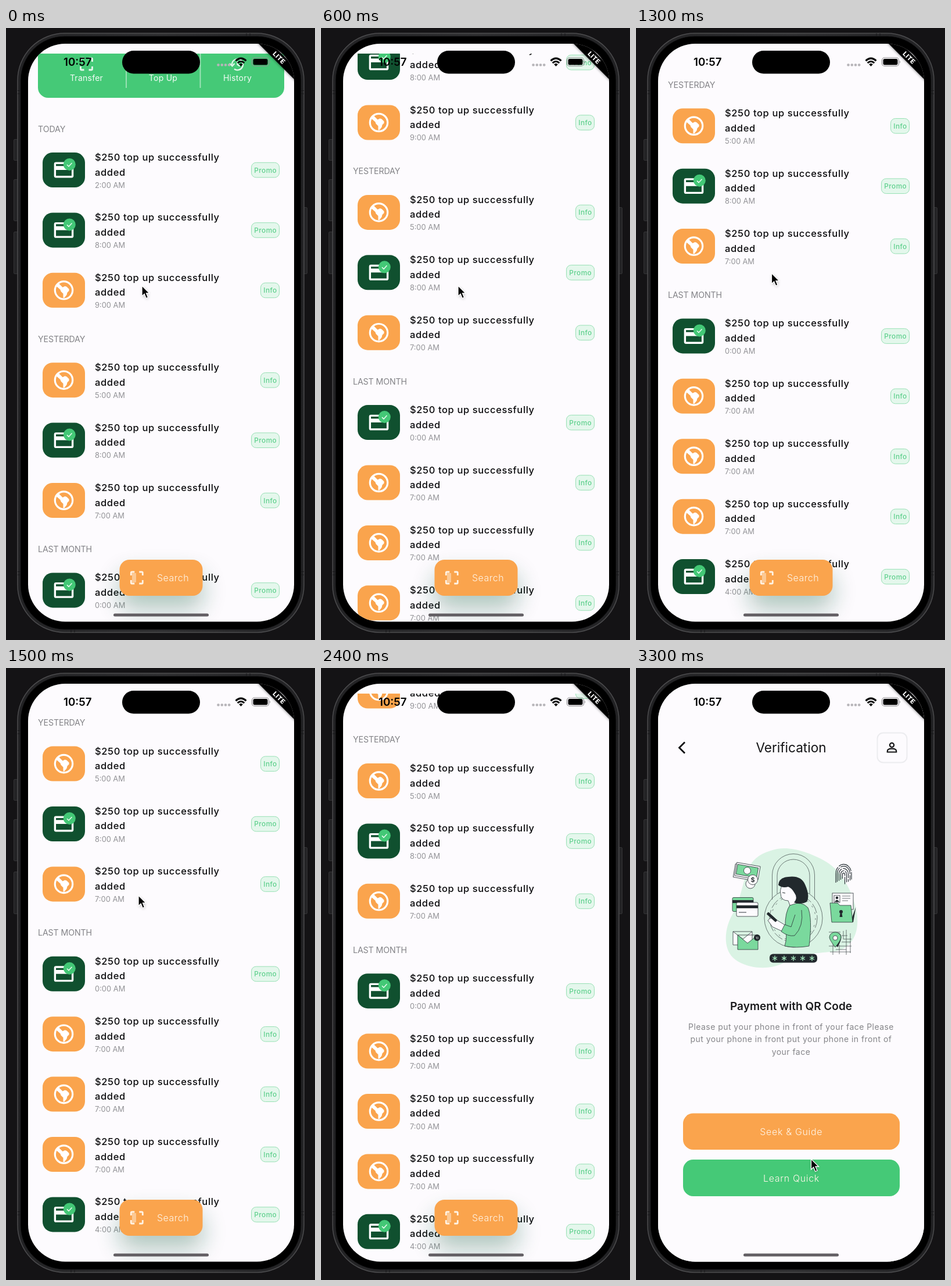
These frames come from a looping animation (532x1052 px, 3400 ms). An HTML page:

```html
<!DOCTYPE html>
<html lang="en">
<head>
<meta charset="utf-8">
<title>Wallet history</title>
<style>
  html, body { margin: 0; width: 100%; height: 100%; overflow: hidden; background: #141315; }
  svg { display: block; width: 532px; height: 1052px; }
  text { font-family: Inter, "Open Sans", sans-serif; }
  .mid { text-anchor: middle; }
  .head { font-size: 14.2px; fill: #838387; letter-spacing: -.1px; }
  .title { font-size: 16.5px; font-weight: 500; letter-spacing: .62px; fill: #0c0c0e; }
  .time { font-size: 12.9px; fill: #929296; }
  .tag { font-size: 11.8px; font-weight: 500; letter-spacing: .45px; fill: #5fd08d; }
  .tab { font-size: 14px; letter-spacing: .25px; fill: #f3fcf6; }
  .btn { font-size: 16px; letter-spacing: .65px; font-weight: 300; fill: #fff6ea; }
  .copy { font-size: 14px; letter-spacing: .45px; fill: #858589; }
  .line { fill: none; stroke: #2b3338; stroke-width: 1; }
  .thin { fill: none; stroke: #4f5a58; stroke-width: .8; }
  .ink { fill: #22292d; }
  .green { fill: #7ad99d; stroke: #2b3338; stroke-width: .8; }
  .paper { fill: #fdfbfe; stroke: #2b3338; stroke-width: .8; }
</style>
</head>
<body>
<svg viewBox="0 0 532 1052">
  <defs>
    <clipPath id="screen"><rect x="38" y="27" width="458" height="993.5" rx="64"/></clipPath>
    <clipPath id="view"><rect x="38" y="44" width="458" height="977"/></clipPath>
    <filter id="soft" x="-50%" y="-120%" width="200%" height="340%"><feGaussianBlur stdDeviation="20"/></filter>
    <filter id="dim" x="-50%" y="-50%" width="200%" height="200%"><feGaussianBlur stdDeviation="2.5"/></filter>
    <linearGradient id="rim" x2="1">
      <stop stop-color="#222224"/><stop offset=".5" stop-color="#303032"/><stop offset="1" stop-color="#222224"/>
    </linearGradient>
    <g id="cardIcon">
      <rect x="-36.5" y="-30" width="73" height="60" rx="17.5" fill="#10502f"/>
      <path transform="scale(1.68) translate(-12 -12)" fill="#fff" fill-rule="evenodd" d="M4 4H20Q22 4 22 6V18Q22 20 20 20H4Q2 20 2 18V6Q2 4 4 4ZM4 6V8H20V6ZM4 12V18H20V12Z"/>
      <circle cx="9.8" cy="-9.5" r="10.5" fill="#43c876"/>
      <path d="M5.5-9l3 3 5.5-6" fill="none" stroke="#e9fbf0" stroke-width="1.5"/>
    </g>
    <g id="globeIcon">
      <rect x="-36.5" y="-30" width="73" height="60" rx="17.5" fill="#faa44d"/>
      <circle r="15.2" fill="none" stroke="#fff" stroke-width="3.2"/>
      <path fill="#fff" d="M-13-7L-9-12-2-5 2-7 5-6 9-2V1L6 4 5 8 1 13H-1V6L-5 2-6-1Z"/>
    </g>
    <g id="scanIcon" fill="none" stroke-width="2.8">
      <path d="M-10-4V-8.500Q-10-10-8.500-10H-4M4-10H8.500Q10-10 10-8.500V-4M10 4V8.500Q10 10 8.500 10H4M-4 10H-8.500Q-10 10-10 8.500V4"/>
    </g>
  </defs>

  <!-- phone body -->
  <g fill="#232325" stroke="#343436">
    <rect x="13.500" y="191.500" width="8" height="36" rx="1.500"/>
    <rect x="13.500" y="260.500" width="8" height="71" rx="1.500"/>
    <rect x="13.500" y="350.500" width="8" height="72" rx="1.500"/>
    <rect x="511" y="308.500" width="7.500" height="114" rx="1.500"/>
  </g>
  <rect x="20" y="9" width="493" height="1030" rx="81" fill="url(#rim)" stroke="#4c4c4e" stroke-width="1.500"/>
  <path d="M20 107.500h5M20 113h5M20 934.500h5M20 940h5M508 107.500h5M508 113h5M508 934.500h5M508 940h5M414 9v5M420 9v5M112 1034v5M118 1034v5" stroke="#171719"/>
  <rect x="25" y="14" width="483" height="1020" rx="76" fill="#000" stroke="#1a1a1c"/>

  <g clip-path="url(#screen)">
    <rect x="38" y="27" width="458" height="994" fill="#fdfbfe"/>

    <g id="home">
      <g clip-path="url(#view)">
        <g id="list">
          <rect x="55" y="-20" width="424" height="140" rx="17.500" fill="#45c977"/>
          <path d="M207 20V103M334.500 20V103" stroke="#a3e4bb" stroke-width="1.800"/>
          <use href="#scanIcon" x="138.500" y="62" stroke="#e6f8ed"/>
          <path d="M389 63a9.500 9.500 0 1 1 4 7.500M385 61l4.500 4.500 4-4.500M398.500 57v6l4 2.500" fill="none" stroke="#e6f8ed" stroke-width="2.200"/>
          <text class="tab mid" x="138.500" y="90.500">Transfer</text>
          <text class="tab mid" x="270.500" y="90.500">Top Up</text>
          <text class="tab mid" x="398.500" y="90.500">History</text>
        </g>
      </g>
      <rect x="195.500" y="937" width="143" height="62" rx="17" fill="#0f5a3a" opacity=".32" filter="url(#soft)"/>
      <rect x="195.500" y="914" width="143" height="62" rx="17" fill="#faa44d"/>
      <rect x="217" y="937" width="7" height="16" fill="#fff" opacity=".4"/>
      <use href="#scanIcon" x="225.300" y="945" stroke="#fff3e4"/>
      <text class="btn" x="260" y="951" style="letter-spacing:.5px">Search</text>
    </g>

    <g id="verify">
      <rect x="38" y="44" width="458" height="977" fill="#fdfbfe"/>
      <path d="M84 127.500L74.500 137 84 146.500" fill="none" stroke="#0c0c0e" stroke-width="2.800"/>
      <text class="mid" x="267" y="144.700" font-size="22.600" fill="#141416">Verification</text>
      <rect x="415.500" y="111.500" width="51" height="51" rx="10" fill="#fdfbfe" stroke="#ececef" stroke-width="2"/>
      <g fill="none" stroke="#161618" stroke-width="2.200">
        <circle cx="440.500" cy="132.500" r="3.600"/>
        <path d="M432.800 144.500V143Q432.800 138.600 440.500 138.600T448.200 143V144.500Z"/>
      </g>

      <path fill="#daf3e4" d="M235 313C262 304 298 317 322 330C350 344 373 380 380 420C386 458 370 486 335 488C298 491 280 494 252 508C222 522 184 514 167 498C149 480 152 446 168 420C180 398 182 374 192 349C200 328 214 319 235 313Z"/>
      <path class="thin" d="M234.500 398V356A36.500 36.500 0 0 1 307.500 356V398M243 388V357A28 28 0 0 1 299 357V388"/>
      <circle class="thin" cx="271" cy="430" r="50"/>
      <circle class="thin" cx="271" cy="430" r="41" stroke-dasharray="17 4"/>
      <circle class="thin" cx="271" cy="430" r="38" stroke-dasharray="3 9"/>

      <!-- figure with phone -->
      <path class="green" d="M266 406Q285 400 296 412Q304 430 298 478Q276 482 256 478Q261 462 257 446Q256 420 266 406Z"/>
      <path class="paper" d="M252 372Q247 383 249 388Q249 400 262 400L265 408 278 404 274 378Z"/>
      <path class="ink" d="M245 373Q246 360 262 359Q284 356 291 372Q300 392 294 402Q283 408 272 403Q279 395 273 387Q268 378 262 376Q252 379 245 373Z"/>
      <path d="M252 386l5 1" class="line"/>
      <path class="paper" d="M227 434Q232 426 242 433L260 444 255 454 235 445Z"/>
      <path class="green" d="M285 416Q289 444 273 460Q262 462 250 453L256 441 267 445 274 424"/>
      <rect class="ink" x="-9" y="-2.200" width="21" height="4.800" rx="1" transform="translate(233 427) rotate(42)"/>

      <g transform="rotate(10 189 351)">
        <rect class="paper" x="169" y="340" width="41" height="23"/>
        <rect class="paper" x="171" y="337" width="41" height="23"/>
        <rect class="green" x="173" y="340" width="36" height="17"/>
        <circle class="paper" cx="191" cy="348" r="6"/>
      </g>
      <circle class="paper" cx="197" cy="371" r="8"/>
      <circle class="paper" cx="201" cy="364" r="8.500"/>
      <text class="mid" x="201" y="368" font-size="11" font-weight="600" fill="#22292d">$</text>

      <rect class="green" x="166" y="394.500" width="36" height="24" rx="2"/>
      <rect class="ink" x="166" y="399" width="36" height="5"/>
      <rect class="paper" x="173" y="403" width="37" height="24" rx="2"/>
      <rect class="ink" x="173" y="408" width="37" height="5"/>
      <path class="line" d="M177 420h13"/>

      <path class="paper" d="M167 453H200V476H167ZM167 453L184 466 200 453"/>
      <path class="green" d="M175 459H210V484H175ZM175 459L192 473 210 459"/>
      <circle class="ink" cx="208.500" cy="463.500" r="5.500"/>
      <text class="mid" x="208.500" y="465.500" font-size="5" fill="#fff">10</text>

      <g id="print" class="line" style="stroke-width:1.200"></g>

      <rect class="paper" x="338" y="387" width="36" height="28"/>
      <rect class="paper" x="341" y="391" width="10" height="12"/>
      <circle class="ink" cx="346" cy="395" r="2.300"/>
      <path class="ink" d="M342 402q4-7 8 0z"/>
      <path class="thin" d="M355 392h14M355 396h14M355 400h10"/>
      <path class="ink" d="M369 437L378.500 411 374 437Z"/>
      <path class="green" d="M334 404H347L351 408H370L373 437H337Z"/>
      <circle class="ink" cx="353" cy="419" r="3"/>
      <path class="ink" d="M352 419h2l1.500 9h-5z"/>

      <path class="thin" d="M332 454H352M357 452V466H371M332 478H371M334 488H370M339 474V493M350 476V492M362 450V493M369 456V490M354 460H364M354 471H370M344 484H362"/>
      <path class="ink" d="M347 480Q335 466 337 461Q341 452 350 456Q358 461 347 480Z"/>
      <path class="green" d="M343 480Q333 467 333 463A10 9 0 0 1 353 463Q353 468 343 480Z"/>
      <circle class="paper" cx="343" cy="464" r="4"/>
      <rect class="ink" x="230" y="491.500" width="82" height="15" rx="6"/>
      <g id="stars" stroke="#a4e8bd" stroke-width="1.400"></g>

      <text class="mid" x="267" y="587.500" font-size="19" font-weight="600" fill="#19191b">Payment with QR Code</text>
      <text class="copy mid" x="267" y="622">Please put your phone in front of your face Please</text>
      <text class="copy mid" x="267" y="643.300">put your phone in front put your phone in front of</text>
      <text class="copy mid" x="267" y="664.500">your face</text>
      <rect x="81" y="765.500" width="373" height="62.500" rx="17.500" fill="#faa44d"/>
      <text class="btn mid" x="267.300" y="802.500">Seek &amp; Guide</text>
      <rect x="81" y="845" width="373" height="63" rx="17.500" fill="#45c977"/>
      <text class="btn mid" x="267.500" y="882.500">Learn Quick</text>
    </g>

    <!-- corner ribbon -->
    <path d="M400-8L510 102V80L422-8Z" opacity=".55" filter="url(#dim)"/>
    <path d="M400-8L510 102V80L422-8Z"/>
    <text class="mid" transform="translate(470.300 51) rotate(45)" y="4" font-size="11" font-weight="800" letter-spacing=".4" fill="#fff">LITE</text>

    <!-- status bar -->
    <text x="99" y="65.300" font-size="18.800" font-weight="600">10:57</text>
    <g fill="#b7b5b9">
      <circle cx="365.500" cy="63.500" r="2.300"/><circle cx="371.800" cy="63.500" r="2.300"/>
      <circle cx="378" cy="63.500" r="2.300"/><circle cx="384.200" cy="63.500" r="2.300"/>
    </g>
    <g fill="none" stroke="#000" stroke-width="3">
      <path d="M395.500 56.300Q404.500 48 413.500 56.300M398.700 60.200Q404.500 54.800 410.300 60.200"/>
    </g>
    <path d="M401.200 62.500Q404.500 59.700 407.800 62.500L404.500 66Z"/>
    <rect x="423.500" y="51" width="29" height="14.500" rx="4.500" fill="none" stroke="#8f8d91" stroke-width="1.200"/>
    <rect x="425.500" y="53" width="25" height="10.500" rx="2.800"/>
    <path d="M454 56q2 2.300 0 4.800z" fill="#8f8d91"/>
    <rect x="185" y="1006.500" width="164" height="5" rx="2.500" fill="#625e63"/>
  </g>
  <rect x="200" y="39" width="134" height="39.500" rx="19.700"/>

  <g id="cursor">
    <path d="M1 2V20L5 16 8 23 11 22 8.500 15H13Z" opacity=".3" filter="url(#dim)"/>
    <path d="M0 0V18L4.200 14.200 7.200 21.500 10.500 20 7.500 13H13Z" stroke="#fff" stroke-width="1.300"/>
  </g>
</svg>
<script>
  const $ = id => document.getElementById(id);
  const LOOP = 3400, STEP = 100, WIDTH = 458;

  const sections = [
    ['TODAY', 'P2 P8 I9'],
    ['YESTERDAY', 'I5 P8 I7'],
    ['LAST MONTH', 'P0 I7 I7 I7 P4']
  ];

  function row(code, y) {
    const promo = code[0] === 'P';
    const left = promo ? 422.5 : 438.5;
    return `<g transform="translate(0 ${y})">
      <use href="#${promo ? 'cardIcon' : 'globeIcon'}" x="99.5"/>
      <text class="title" x="153" y="-16">$250 top up successfully</text>
      <text class="title" x="153" y="9.5">added</text>
      <text class="time" x="153" y="30.6">${code[1]}:00 AM</text>
      <rect x="${left}" y="-12.7" width="${470.5 - left}" height="25.6" rx="8" fill="#e4f7ec" stroke="#97e0b4"/>
      <text class="tag" x="${left + 4.8}" y="4.5">${promo ? 'Promo' : 'Info'}</text>
    </g>`;
  }

  $('list').innerHTML += sections.map(([name, codes], k) => {
    const top = 361.2 * k;
    return `<text class="head" x="55" y="${178.5 + top}">${name}</text>` +
      codes.split(' ').map((c, j) => row(c, 244 + top + 103.4 * j)).join('');
  }).join('');

  // nested ridges of the fingerprint
  $('print').innerHTML = [2, 5, 8, 11, 13.5].map(r =>
    `<path d="M${357.5 - r} ${361 + r * .6}V${355 - r * .1}A${r} ${r * 1.2} 0 0 1 ${357.5 + r} ${355 - r * .1}V${373 - r * .7}" stroke-dasharray="${14 + r} 2"/>`).join('');

  $('stars').innerHTML = [0, 1, 2, 3, 4].map(i =>
    [0, 60, 120].map(a => `<path d="M0-4.5V4.500" transform="translate(${239 + i * 16} 499) rotate(${a})"/>`).join('')).join('');

  const scroll = [[0, 0], [200, 137.6], [600, 288.3], [1000, 417.8], [1500, 440.6], [2400, 411.2], [3000, 410.8]];
  const pointer = [[0, 234, 443], [200, 223.5, 485], [600, 236, 443], [1000, 243.5, 478], [1500, 228, 391],
    [1800, 232, 420], [2300, 262, 985], [2500, 284, 1005], [2900, 286, 950], [3300, 301.5, 844]];

  const easeOut = u => u * (2 - u);
  const smooth = u => u * u * (3 - 2 * u);

  function sample(keys, t, ease) {
    const i = keys.findIndex(k => k[0] > t);
    if (i < 0) return keys[keys.length - 1].slice(1);
    const a = keys[i - 1], b = keys[i];
    const u = ease((t - a[0]) / (b[0] - a[0]));
    return a.slice(1).map((v, n) => v + (b[n + 1] - v) * u);
  }

  const move = (id, x, y) => $(id).setAttribute('transform', `translate(${x.toFixed(2)} ${y.toFixed(2)})`);

  function draw(ms) {
    const t = Math.floor(ms % LOOP / STEP) * STEP;
    const push = easeOut(Math.min(1, Math.max(0, (t - 3000) / 300)));
    move('list', 0, -sample(scroll, t, easeOut)[0]);
    move('home', -push * WIDTH / 3, 0);
    move('verify', (1 - push) * WIDTH, 0);
    move('cursor', ...sample(pointer, t, smooth));
    $('cursor').style.visibility = t === 2400 ? 'hidden' : 'visible';
  }

  const start = performance.now();
  function tick() {
    draw(performance.now() - start);
    requestAnimationFrame(tick);
  }
  tick();
</script>
</body>
</html>
```
